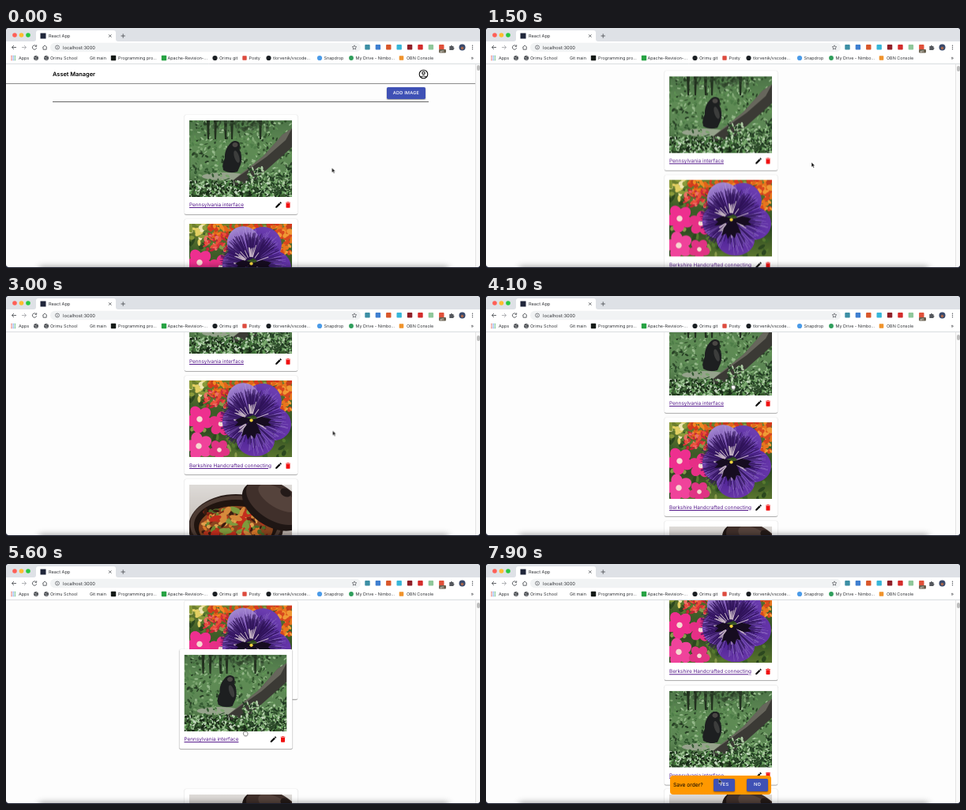
Write an HTML page with a canvas that moves like this. It is 600x304 px and loops after 8 s.

```html
<!DOCTYPE html>
<html lang="en">
<head>
<meta charset="utf-8">
<title>Asset Manager</title>
<style>
html, body { margin: 0; width: 100%; height: 100%; overflow: hidden; background: #1d2030; }
body { font-family: Inter, "Open Sans", sans-serif; text-rendering: geometricPrecision; }
#stage { position: relative; width: 600px; height: 304px; overflow: hidden; }
#window { position: absolute; inset: 0 0 1px; overflow: hidden; border-radius: 4px; background: #fdfdfd; }
#browser { position: absolute; left: 0; top: 0; }
#browser text { font-size: 5.4px; fill: #303236; }
#view { position: absolute; left: 0; top: 46px; width: 600px; height: 257px; overflow: hidden; }
#page { animation: scroll 8s infinite; }
#page, #page > *, .card > *, #snack > * { position: absolute; }

#bar { width: 600px; height: 24px; background: #fff; border-bottom: 1px solid #8c8c8c; }
#bar b { position: absolute; left: 59px; top: 7px; font: 600 7.4px/11px Inter, sans-serif; }
#bar svg { position: absolute; left: 522px; top: 6px; }
#rule { left: 59px; top: 47px; width: 476px; height: 1px; background: #666; }
.btn { box-sizing: border-box; border-radius: 1.7px; background: #3f51b5; color: #fff; text-align: center;
  font-size: 5.7px; font-weight: 500; letter-spacing: .028em; box-shadow: 0 1px 2px #0006; white-space: nowrap; }
#add { left: 482px; top: 28.5px; width: 49px; height: 15.5px; line-height: 15.5px; }

.card { left: 225.5px; width: 143px; height: 125.5px; background: #fff; border-radius: 1.7px;
  box-shadow: 0 .8px .9px #0006, 0 0 1.2px #0003; }
.card canvas { left: 6.5px; top: 6.5px; width: 130px; height: 97px; }
.card u { left: 6.5px; top: 109px; font-size: 6.43px; line-height: 10px; color: #551a8b; white-space: nowrap; text-decoration-thickness: .6px; }
.card svg { top: 109px; width: 10px; height: 10px; }
.card .pen { left: 114px; }
.card .bin { left: 126px; fill: #f01010; }
#card0 { z-index: 2; animation: drag 8s infinite; }
#card1 { animation: swap 8s infinite; }

#track { position: absolute; left: 594px; top: 46px; width: 6px; height: 257px; background: #fafafa; border-left: .5px solid #e4e4e4; box-sizing: border-box; }
#track i { position: absolute; left: 1px; top: 1px; width: 3.6px; height: 6.5px; border-radius: 2px; background: #bdbdbd; animation: thumb 8s infinite; }
#dock { position: absolute; left: 45px; top: 306px; width: 512px; height: 8px; box-shadow: 0 0 9px 3px #0007; }

#snack { position: absolute; left: 233px; top: 268px; width: 128px; height: 23.5px; border-radius: 4px; background: #ff9800; animation: pop 8s infinite; }
#snack span { left: 4px; top: 6.5px; font-size: 6.7px; line-height: 11px; white-space: nowrap; }
#snack .btn { top: 4px; width: 27px; height: 16px; line-height: 16px; }

#mouse { position: absolute; left: 0; top: 0; overflow: visible; animation: move 8s infinite ease-in-out; }
#arrow { animation: arrow 8s infinite step-end; }
#hand { animation: hand 8s infinite step-end; }

@keyframes scroll {
  0%, 15% { transform: none; animation-timing-function: linear; }
  18.75% { transform: translateY(-55.5px); animation-timing-function: ease-out; }
  30%, 38.5% { transform: translateY(-141px); animation-timing-function: ease-out; }
  47%, 100% { transform: translateY(-88px); }
}
@keyframes thumb {
  0%, 15% { transform: none; animation-timing-function: linear; }
  18.75% { transform: translateY(1px); animation-timing-function: ease-out; }
  30%, 38.5% { transform: translateY(3px); animation-timing-function: ease-out; }
  47%, 100% { transform: translateY(2px); }
}
/* The card travels in one sweep; its neighbour gives way once their edges pass halfway. */
@keyframes drag {
  0%, 62.5% { transform: none; animation-timing-function: ease-in-out; }
  75%, 78% { transform: translate(-9.7px, 128.5px); animation-timing-function: cubic-bezier(.2, 1, .1, 1); }
  82.2%, 100% { transform: translate(0, 131.7px); }
}
@keyframes swap {
  0%, 68.97% { transform: none; animation-timing-function: cubic-bezier(.2, 0, 0, 1); }
  71.47%, 100% { transform: translateY(-131.7px); }
}
@keyframes pop {
  0%, 86.5% { opacity: 0; transform: scale(.75, .56); }
  89.3%, 99.99% { opacity: 1; transform: none; }
  100% { opacity: 0; }
}
@keyframes move {
  0%, 3% { transform: translate(412.5px, 177px); }
  11%, 18.75% { transform: translate(412px, 170px); }
  32%, 41% { transform: translate(413.5px, 170.5px); }
  50.5% { transform: translate(312px, 111px); }
  56%, 62.5% { transform: translate(308.5px, 125px); }
  75%, 86.5% { transform: translate(298.8px, 253.5px); }
  96%, 100% { transform: translate(294.5px, 272px); }
}
@keyframes arrow { 0% { visibility: visible; } 46% { visibility: hidden; } 88.5% { visibility: visible; } }
@keyframes hand { 0% { visibility: hidden; } 46% { visibility: visible; } 88.5% { visibility: hidden; } }
</style>
</head>
<body>
<div id="stage">
  <div id="window">
    <div id="view">
      <div id="page">
        <div id="bar">
          <b>Asset Manager</b>
          <svg width="13" height="13" fill="none" stroke="#111" stroke-width="1.1"><circle cx="6.5" cy="6.5" r="5.3"/><circle cx="6.5" cy="5" r="1.7"/><path d="M3 10.2q3.5-3 7 0"/></svg>
        </div>
        <div id="add" class="btn">ADD IMAGE</div>
        <div id="rule"></div>
      </div>
    </div>
    <div id="track"><i></i></div>
    <svg id="browser" width="600" height="46">
      <path fill="#dee1e6" d="M0 0H600V17H0z"/>
      <path fill="#fff" d="M35 17q3 0 3-3V6q0-3 3-3h95q3 0 3 3v8q0 3 3 3H600v28.5H0V17z"/>
      <path stroke="#cfd2d6" stroke-width=".8" d="M0 45.4H600"/>
      <circle cx="11" cy="9" r="2.8" fill="#ff5f57"/><circle cx="19.5" cy="9" r="2.8" fill="#febc2e"/><circle cx="28" cy="9" r="2.8" fill="#28c840"/>
      <rect x="43.5" y="6.5" width="7" height="7" fill="#20263a"/>
      <text x="54" y="12" style="font-size:5.6px">React App</text>
      <rect x="56" y="18.7" width="393" height="11.6" rx="5.8" fill="#f1f3f4"/>
      <g fill="none" stroke="#55585d" stroke-width=".9">
        <path d="M130 8.3l3.4 3.4m0-3.4l-3.4 3.4M145.5 10h5.4m-2.7-2.7v5.4"/>
        <path d="M13 24.5H7.5m2.5-2.5l-2.5 2.5 2.5 2.5"/>
        <path stroke="#a9abae" d="M20 24.5h5.5m-2.5-2.5l2.5 2.5-2.5 2.5"/>
        <path d="M38.3 23a2.7 2.7 0 1 0 .4 2.2M38.7 21.4v2h-2"/>
        <path d="M46.2 24.6l2.9-2.6 2.9 2.6M47 24.2v3h4.2v-3"/>
        <circle cx="65" cy="24.5" r="2.5" stroke-width=".7"/><path stroke-width=".7" d="M65 24v1.8m0-3v.6"/>
        <path stroke-width=".7" d="M441 21.8l.8 1.8 2 .2-1.5 1.3.4 2-1.7-1-1.7 1 .4-2-1.5-1.3 2-.2z"/>
      </g>
      <text x="72" y="26.6" style="font-size:5.8px">localhost:3000</text>
      <path fill="#55585d" d="M561.3 23h1.6a1 1 0 1 1 2 0h1.6v1.7a1 1 0 1 1 0 2v1.2h-5.2z"/>
      <circle cx="577.5" cy="24.5" r="4" fill="#3b4a6b"/><circle cx="577.5" cy="25.5" r="1.8" fill="#a8674c"/>
      <g fill="#55585d"><circle cx="590.5" cy="22.2" r=".7"/><circle cx="590.5" cy="24.5" r=".7"/><circle cx="590.5" cy="26.8" r=".7"/></g>
      <g id="marks"></g>
      <rect x="548" y="27" width="9" height="4.6" rx="1" fill="#68604f"/>
      <text x="549.2" y="30.5" style="font-size:3.6px;fill:#fff">off</text>
      <text x="588.5" y="40" style="font-size:6px">»</text>
    </svg>
    <div id="snack">
      <span>Save order?</span>
      <div class="btn" style="left:55px">YES</div>
      <div class="btn" style="left:97px">NO</div>
    </div>
    <div id="dock"></div>
    <svg id="mouse" width="8" height="9">
      <path id="arrow" fill="#111" stroke="#fff" stroke-width=".5" d="M0 0V6.2L1.4 5l1.1 2.3 1-.5L2.5 4.6H4.4z"/>
      <path id="hand" fill="#fff" stroke="#222" stroke-width=".6" d="M-1.6 3.4q-.2-1.8 1-1.4.4-1 1.2-.4.8-.7 1.4.1 1-.4 1.2.6 1 0 .8 1.4Q4 6 2.8 6.8H0Q-1.4 5.6-1.6 3.4z"/>
    </svg>
  </div>
</div>
<script>
const dot = (x, y, r, c) => `<circle cx="${x}" cy="${y}" r="${r}" fill="${c}"/>`;
const box = (x, y, s, c) => `<rect x="${x - s / 2}" y="${y - s / 2}" width="${s}" height="${s}" rx=".8" fill="${c}"/>`;
const globe = x => dot(x, 38, 3, '#4a4d52') +
  `<path fill="none" stroke="#fff" stroke-width=".5" d="M${x - 2.6} 37q2 2 3 0t2-1M${x - 1} 40.6q0-1.6 2.6-1.4"/>`;
const label = (x, s) => `<text x="${x}" y="39.9">${s}</text>`;

let apps = '';
const appTones = ['#e0483c', '#4a86e8', '#3ba55d'];
for (let i = 0; i < 9; i++) apps += box(7 + i % 3 * 2.2, 35.8 + (i / 3 | 0) * 2.2, 1.5, appTones[i % 3]);

const tools = ['#3d8fa5', '#3f7fd0', '#d8572a', '#38b6d8', '#8f1f28', '#d42c2c', '#8fc79a', '#e0503a'];
document.getElementById('marks').innerHTML = apps +
  tools.map((c, i) => box(457.5 + i * 13.4, 24.3, 6.4, c)).join('') +
  globe(38) + globe(51) + box(136, 38, 6.4, '#151a17') + box(200, 38, 6.4, '#27a243') +
  dot(264.5, 38, 3.1, '#1b1f23') + box(302, 38, 5.4, '#dd4b3e') + dot(332.5, 38, 3.1, '#1b1f23') +
  dot(397, 38, 3.1, '#4b9be8') + dot(437, 38, 2.9, '#2f9e5b') + box(500.5, 38, 5.6, '#f0932b') +
  [[16, 'Apps'], [56, 'Orimu School'], [106, 'Git main'], [142, 'Programming pro...'], [204.5, 'Apache-Revision-...'],
   [270, 'Orimu git'], [307.5, 'Posty'], [338, 'tlorvenik/vscode...'], [402.5, 'Snapdrop'],
   [442.5, 'My Drive - Nimbo...'], [507, 'OBN Console']].map(m => label(...m)).join('');

// Photo painters work in a 130 x 97 space.
let g, seed;
const rnd = (a = 0, b = 1) => (seed = seed * 16807 % 2147483647, a + (b - a) * seed / 2147483647);
const pick = list => list[Math.floor(rnd(0, list.length))];
function fill(c, x = 0, y = 0, w = 130, h = 97) { g.fillStyle = c; g.fillRect(x, y, w, h); }
function oval(x, y, rx, ry, c, rot = 0) {
  g.fillStyle = c;
  g.beginPath();
  g.ellipse(x, y, rx, ry, rot, 0, 7);
  g.fill();
}
function shape(c, d) { g.fillStyle = c; g.fill(new Path2D(d)); }
function dabs(n, x0, y0, x1, y1, size, tones) {
  while (n--) oval(rnd(x0, x1), rnd(y0, y1), rnd(.4, 1) * size, rnd(.2, .6) * size, pick(tones), rnd(0, 3));
}
function shade(...stops) {
  const s = g.createLinearGradient(0, 0, 0, 97);
  stops.forEach((c, i) => s.addColorStop(i / (stops.length - 1), c));
  fill(s);
}

function forest() {
  shade('#4d7448', '#5f8c55', '#5c8654', '#38592f');
  dabs(420, 0, 0, 130, 62, 2.8, ['#34552f', '#7da571', '#4e7d48', '#284026', '#94b889', '#5f9254']);
  for (const x of [22, 31, 44, 52, 88]) shape('#22301f', `M${x} 0h4l-1 24h-2z`);
  dabs(60, 30, 0, 100, 12, 4, ['#2a3c2799', '#3c573899']);
  oval(44, 71, 28, 5, '#96a38c');
  dabs(60, 0, 60, 50, 80, 3, ['#4b7844', '#7ba56e', '#345a32']);
  shape('#1d1f20', 'M53 28q5-4 10 0 2 4 0 8 5 9 2 20l-4 9q-10 3-18-2-2-8 2-15-1-11 8-20z');
  oval(58, 31, 3.5, 3, '#4a4744');
  oval(60, 46, 3, 8, '#3c3d3c', -.3);
  shape('#3b3a35', 'M130 10V34L84 75 60 83 52 79 94 45 118 18z');
  shape('#67665c', 'M130 10L118 18 94 45 54 77 98 46 122 25z');
  dabs(560, 0, 77, 130, 97, 2.8, ['#223a1f', '#5e9553', '#9cc392', '#3f6f3a', '#c4d8bf', '#182817']);
  dabs(220, 74, 60, 130, 92, 2.8, ['#2c4b2a', '#79a86d', '#b0cda6', '#1f3821']);
}

function blossom(x, y, r, c) {
  for (let i = 0; i < 5; i++) {
    const a = i * 1.257 + x;
    oval(x + Math.cos(a) * r * .55, y + Math.sin(a) * r * .55, r * .5, r * .42, c, a);
  }
  oval(x, y, r * .22, r * .22, '#f7d9d2');
}

function rays(n, from, to, c, width) {
  g.strokeStyle = c;
  g.lineWidth = width;
  g.beginPath();
  while (n--) {
    const a = rnd(0, 6.28), end = rnd(.7, 1) * to;
    g.moveTo(78 + from * Math.cos(a), 50 + from * Math.sin(a));
    g.lineTo(78 + end * Math.cos(a), 50 + end * Math.sin(a));
  }
  g.stroke();
}

function petal(x, y, rx, ry, mid, edge, rot) {
  const tone = g.createRadialGradient(78, 50, 5, 78, 50, 46);
  [[0, '#241043'], [.4, mid], [1, edge]].forEach(s => tone.addColorStop(...s));
  g.save();
  oval(x, y, rx, ry, tone, rot);
  g.clip();
  rays(170, 14, 48, '#cdb8ea50', .6);
  rays(120, 8, 40, '#24104366', .6);
  g.restore();
  g.strokeStyle = '#2d125899';
  g.lineWidth = .8;
  g.stroke();
}

function pansy() {
  shade('#70822f', '#42602a', '#314c22', '#5a762f');
  dabs(150, 0, 0, 130, 97, 6, ['#56792f', '#2c471f', '#88994a', '#3c5f28']);
  dabs(110, 25, 0, 130, 18, 5, ['#e2641b', '#d63a1e', '#f08a24', '#c7401c']);
  dabs(40, 110, 8, 130, 38, 6, ['#e8761e', '#d8481e', '#f09a35']);
  dabs(24, 0, 0, 22, 24, 6, ['#e2cf62', '#f0e6b0', '#8a9a3a']);
  dabs(60, 20, 12, 54, 34, 4, ['#d62f3a', '#e8503a', '#c22436', '#ee6f66']);
  [[13, 49, 17, '#ee2f8f'], [40, 55, 15, '#e62f86'], [12, 83, 17, '#f0439b'], [38, 88, 13, '#e03384']]
    .forEach(b => blossom(...b));
  petal(94, 26, 23, 22, '#4d2491', '#6b3db0', .4);
  petal(69, 25, 21, 22, '#6a3ea8', '#a184cf', -.4);
  petal(58, 54, 16, 20, '#5a2b9c', '#7a48b8', -.2);
  petal(107, 55, 22, 21, '#4a2190', '#6434a8', .2);
  petal(84, 76, 24, 20, '#4e2494', '#6836a8', 0);
  rays(46, 8, 24, '#e6d8dccc', 1);
  shape('#160c20', 'M76 48l-8-2-10 4 4 3-5 5 9-1 9-4-6 8-3 10 6-3 2 7 4-6 5 5 2-7 6 1-6-14 10 4 9-1-4-4 4-4-12-3-9 3z');
  oval(78.5, 50.5, 2.2, 2, '#f0d23c');
}

function stew() {
  shade('#dedbd8', '#c7c0bb', '#8b7b73');
  oval(59, 54, 60, 42, '#2a1d19');
  oval(59, 50, 58, 36, '#4d3b33');
  oval(59, 51, 53, 32, '#20140f');
  oval(59, 55, 47, 28, '#8a451f');
  dabs(240, 18, 32, 98, 78, 5, ['#b8321c', '#d8782a', '#6f8a32', '#e0a04c', '#7a2113', '#4d6a28', '#3a1c10']);
  dabs(24, 28, 30, 90, 64, 9, ['#7f9a3d', '#c42d1d', '#d68a3c']);
  oval(106, 27, 43, 26, '#1f1614', .55);
  oval(109, 22, 41, 23, '#40302b', .55);
  oval(112, 17, 28, 12, '#55433c', .55);
  oval(122, 10, 7, 5, '#231a18', .5);
}

const icons = {
  pen: 'M3 17.25V21h3.75L17.81 9.94l-3.75-3.75zM20.71 7.04a1 1 0 0 0 0-1.41l-2.34-2.34a1 1 0 0 0-1.41 0l-1.83 1.83 3.75 3.75z',
  bin: 'M6 19a2 2 0 0 0 2 2h8a2 2 0 0 0 2-2V7H6zM19 4h-3.5l-1-1h-5l-1 1H5v2h14z'
};
const icon = k => `<svg class="${k}" viewBox="0 0 24 24"><path d="${icons[k]}"/></svg>`;
const cards = [['Pennsylvania interface', forest], ['Berkshire Handcrafted connecting', pansy], ['Rustic wireless bandwidth', stew]];
cards.forEach(([name, paint], i) => {
  const card = document.createElement('div');
  card.className = 'card';
  card.id = 'card' + i;
  card.style.top = 64 + i * 131.7 + 'px';
  card.innerHTML = `<canvas width="260" height="194"></canvas><u>${name}</u>${icon('pen')}${icon('bin')}`;
  document.getElementById('page').append(card);
  g = card.firstChild.getContext('2d');
  g.scale(2, 2);
  seed = 71 + i;
  paint();
});
</script>
</body>
</html>
```
